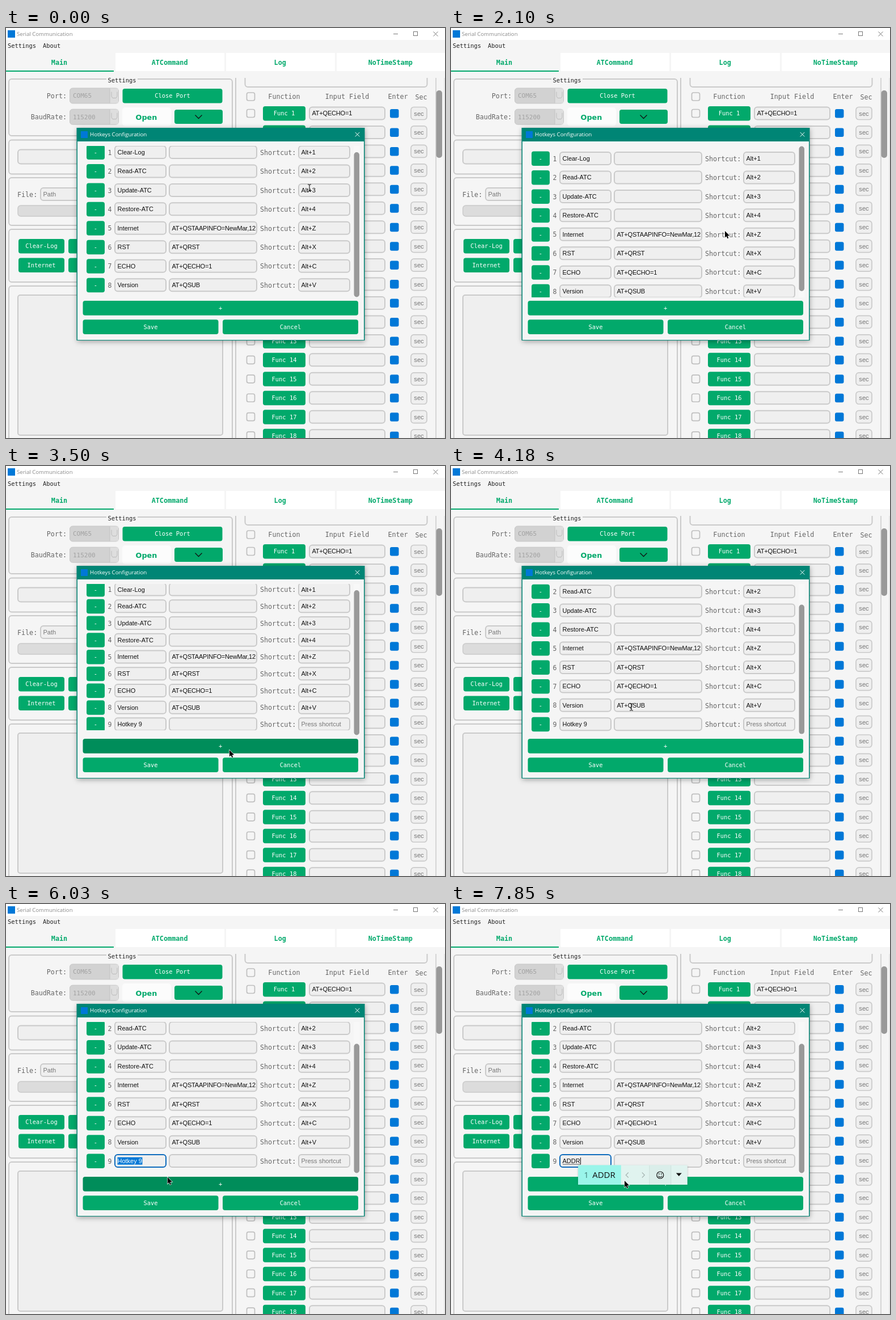
Write an HTML page with a canvas that moves like this. It is 774 px wide and 723 px high and loops after 8 s.

```html
<!DOCTYPE html>
<html lang="en">
<head>
<meta charset="utf-8">
<title>Serial Communication</title>
<style>
  html, body { margin: 0; width: 100%; height: 100%; overflow: hidden; background: #f5f5f5; }
  canvas { display: block; width: 774px; height: 723px; }
</style>
</head>
<body>
<canvas id="stage" width="774" height="723"></canvas>
<script>
const ctx = document.getElementById('stage').getContext('2d');
const LOOP = 8000;
const MONO = '"DejaVu Sans Mono", monospace';
const ARIAL = '"Liberation Sans", sans-serif';
const UI = '"Open Sans", sans-serif';
const GREEN = '#02a96b', HOVER = '#008d5a', BLUE = '#0078d7';
const BG = '#f5f5f5', FIELD = '#efefef', LINE = '#cacaca';
const PITCH = 33.45;

const HOTKEYS = [
  ['Clear-Log', '', 'Alt+1'],
  ['Read-ATC', '', 'Alt+2'],
  ['Update-ATC', '', 'Alt+3'],
  ['Restore-ATC', '', 'Alt+4'],
  ['Internet', 'AT+QSTAAPINFO=NewMar,12', 'Alt+Z'],
  ['RST', 'AT+QRST', 'Alt+X'],
  ['ECHO', 'AT+QECHO=1', 'Alt+C'],
  ['Version', 'AT+QSUB', 'Alt+V'],
  ['Hotkey 9', '', '']
];

// Each pointer move runs in equal steps from start to end through a few points.
const MOVES = [
  { from: 660, to: 990, steps: 6, path: [[535, 282], [483, 358]] },
  { from: 2170, to: 2380, steps: 4, path: [[483, 358], [484, 369]] },
  { from: 2710, to: 3050, steps: 6, path: [[484, 369], [394, 501]] },
  { from: 3760, to: 4180, steps: 7, path: [[394, 501], [318, 425]] },
  { from: 4250, to: 4530, steps: 5, path: [[318, 425], [300, 444], [285, 457]] },
  { from: 4600, to: 5210, steps: 9, path: [[285, 457], [262, 457], [231, 457]] },
  { from: 5280, to: 5350, steps: 2, path: [[231, 457], [200, 457]] },
  { from: 5420, to: 6110, steps: 10, path: [[200, 457], [306, 488]] }
];

const mix = (a, b, k) => a + (b - a) * k;

// Value of the last [time, value] entry already reached.
const at = (t, list) => list.reduce((v, e) => t >= e[0] ? e[1] : v, list[0][1]);

function pointer(t) {
  let pos = MOVES[0].path[0];
  for (const m of MOVES) {
    if (t < m.from) break;
    const step = Math.min(m.steps, Math.floor((t - m.from) / (m.to - m.from) * (m.steps - 1)) + 1);
    const u = step / m.steps * (m.path.length - 1);
    const i = Math.min(Math.floor(u), m.path.length - 2);
    const [a, b] = [m.path[i], m.path[i + 1]];
    pos = [mix(a[0], b[0], u - i), mix(a[1], b[1], u - i)];
  }
  return pos;
}

function box(x, y, w, h, r, fill, stroke, lw = 2) {
  ctx.beginPath();
  ctx.roundRect(x, y, w, h, r);
  if (fill) { ctx.fillStyle = fill; ctx.fill(); }
  if (stroke) { ctx.strokeStyle = stroke; ctx.lineWidth = lw; ctx.stroke(); }
}

function rect(x, y, w, h, fill) {
  ctx.fillStyle = fill;
  ctx.fillRect(x, y, w, h);
}

function line(points, color, lw = 1) {
  ctx.beginPath();
  points.forEach(p => ctx.lineTo(p[0], p[1]));
  ctx.strokeStyle = color;
  ctx.lineWidth = lw;
  ctx.stroke();
}

function text(s, x, cy, size, family, color, align = 'left', weight = '', spacing = 0) {
  ctx.font = `${weight} ${size}px ${family}`;
  ctx.textAlign = align;
  ctx.letterSpacing = spacing + 'px';
  ctx.fillStyle = color;
  ctx.fillText(s, x, cy + size * 0.36);
  ctx.letterSpacing = '0px';
}

function width(s, size, family) {
  ctx.font = `${size}px ${family}`;
  ctx.letterSpacing = '0px';
  return ctx.measureText(s).width;
}

function clipped(x, y, w, h, draw) {
  ctx.save();
  ctx.beginPath();
  ctx.rect(x, y, w, h);
  ctx.clip();
  draw();
  ctx.restore();
}

function button(label, x, y, w, h, fill = GREEN) {
  box(x, y, w, h, 4, fill);
  text(label, x + w / 2, y + h / 2, 10.4, MONO, '#fff', 'center');
}

function field(x, cy, w, value = '', color = '#111', border = LINE) {
  box(x + 1, cy - 11, w - 2, 22, 5, FIELD, border);
  if (!value) return;
  clipped(x, cy - 12, w - 2, 24, () =>
    text(value, x + 5.5, cy, 11, ARIAL, color, 'left', '', value.startsWith('AT+') ? -0.19 : 0));
}

function cross(x, y, r, color) {
  line([[x - r, y - r], [x + r, y + r]], color);
  line([[x + r, y - r], [x - r, y + r]], color);
}

function header() {
  rect(0, 0, 774, 21, '#fff');
  rect(3, 4, 13, 13, BLUE);
  text('Serial Communication', 19, 10.5, 9.6, UI, '#8a8a8a');
  line([[683, 10.5], [691, 10.5]], '#777');
  ctx.strokeRect(718.5, 6.5, 7, 7);
  cross(757.5, 10.5, 4, '#777');
  text('Settings', 3, 31, 10.4, MONO, '#222');
  text('About', 65, 31, 10.4, MONO, '#222');
  ['Main', 'ATCommand', 'Log', 'NoTimeStamp'].forEach((name, i) => {
    if (i) rect(i * 195 - 2, 44, 192, 32, '#fff');
    text(name, 94 + i * 194.6, 61, 11.8, MONO, GREEN, 'center', 'bold');
  });
  rect(0, 75, 190, 2, GREEN);
}

function combo(label, value, y) {
  text(label, 107, y, 11.7, MONO, '#666', 'right');
  box(112.5, y - 13.5, 86, 27, 5, '#d2d2d2', '#c6c6c6', 1);
  rect(183, y - 13, 15, 26, '#dedede');
  line([[183, y - 13], [183, y + 13]], '#c2c2c2');
  line([[186, y - 7], [186, y + 1], [188, y + 4], [194, y + 4], [196, y + 1], [196, y - 7]], '#bbb');
  text(value, 118, y, 11, MONO, '#a2a2a2');
}

function leftPanel() {
  [[90, 100], [197.5, 60], [264, 84], [355, 93], [455, 290]].forEach(([y, h]) =>
    box(5, y, 394, h, 5, null, LINE));
  rect(177, 86, 55, 12, BG);
  text('Settings', 204.5, 92, 10.4, MONO, '#222', 'center');
  combo('Port:', 'COM65', 119.5);
  combo('BaudRate:', '115200', 156.7);
  button('Close Port', 205.5, 107, 176, 25.5);
  box(205, 140, 86, 33, 5, '#fcfcfc');
  text('Open', 247.5, 157, 12.8, '"DejaVu Sans", sans-serif', GREEN, 'center', 'bold');
  box(297, 144, 85, 25, 4, GREEN);
  line([[333.5, 153.5], [339.5, 159.5], [345.5, 153.5]], '#111', 1.3);

  box(21, 214.5, 361, 25, 5, FIELD, LINE);
  text('File:', 20, 293.5, 11.7, MONO, '#666');
  field(60, 293, 240, 'Path', '#777');
  box(21, 313, 361, 19, 5, '#dcdcdc', LINE, 1.5);
  button('Clear-Log', 22, 372, 81, 25.5);
  box(110, 372, 81, 25.5, 4, GREEN);
  button('Internet', 22, 405.5, 81, 25.5);
  box(110, 405.5, 81, 25.5, 4, GREEN);
  box(21, 471, 361, 247, 4, FIELD, LINE);
}

function rightPanel() {
  clipped(400, 88, 374, 635, () => {
    line([[405, 88], [405, 723]], LINE, 2);
    line([[758, 88], [758, 723]], LINE, 1.5);
    line([[773, 88], [773, 723]], '#dadada');
    box(421.5, 60, 321, 44, 5, null, LINE);
    box(758.5, 110, 10.5, 119, 5, '#999');
    box(424.5, 114, 14, 14, 3, BG, '#bfbfbf', 1.7);
    text('Function', 490.5, 121, 11.7, MONO, '#666', 'center');
    text('Input Field', 601.5, 121, 11.7, MONO, '#666', 'center');
    text('Enter', 691, 121, 11.7, MONO, '#666', 'center');
    text('Sec', 732, 121.5, 11.7, MONO, '#666', 'center');
    for (let i = 0; i < 18; i++) {
      const y = 150.5 + i * PITCH;
      box(424.5, y - 7, 14, 14, 3, BG, '#bfbfbf', 1.7);
      button('Func ' + (i + 1), 453, y - 12.5, 75, 25.5);
      field(534, y, 135, i ? '' : 'AT+QECHO=1');
      box(677, y - 7.5, 15.5, 15.5, 3, BLUE);
      box(714, y - 11, 28, 22, 5, FIELD, LINE, 1.7);
      text('sec', 728, y, 11.2, ARIAL, '#777', 'center');
    }
  });
}

// Caret index nearest to x in the edited name field.
function caretIndex(s, x) {
  let i = 0;
  while (i < s.length && 197.5 + (width(s.slice(0, i), 11, ARIAL) + width(s.slice(0, i + 1), 11, ARIAL)) / 2 < x) i++;
  return i;
}

function editor(st, y) {
  field(191, y, 92, st.typed || 'Hotkey 9', '#111', '#0f6cbd');
  if (st.typed) {
    const end = 197.5 + width(st.typed, 11, ARIAL);
    line([[197, y + 6], [end, y + 6]], '#333', 0.8);
    if (st.t >= 7850) line([[228.5, y - 6], [228.5, y + 6]], '#111');
    return;
  }
  const s = 'Hotkey 9';
  const i = caretIndex(s, Math.min(st.x, st.t < 5420 ? 300 : 200));
  if (i < s.length && st.t >= 4600) {
    const x0 = 196.5 + width(s.slice(0, i), 11, ARIAL);
    const w = 197 + width(s, 11, ARIAL) - x0;
    rect(x0, y - 6.5, w, 13, BLUE);
    clipped(x0, y - 8, w, 16, () => text(s, 196.5, y, 11, ARIAL, '#fff'));
  }
  if (st.t >= 6650) line([[198.5, y - 6], [198.5, y + 6]], '#111');
}

function hotkeyRow(row, i, y, st) {
  button('-', 142, y - 12.5, 32, 25.5);
  text(i + 1, 183, y + 0.5, 11.5, MONO, '#666', 'center');
  if (i === 8 && st.focus) editor(st, y);
  else field(191, y, 92, row[0]);
  field(287, y, 156, row[1]);
  text('Shortcut:', 448, y + 0.5, 11.7, MONO, '#666');
  field(515, y, 92, row[2] || 'Press shortcut', row[2] ? '#111' : '#777');
}

function dialog(st) {
  ctx.save();
  ctx.shadowColor = 'rgba(0,0,0,.35)';
  ctx.shadowBlur = 9;
  ctx.shadowOffsetY = 2;
  rect(124.5, 176, 508, 375, '#008575');
  ctx.restore();
  rect(126, 200, 505, 350, BG);
  rect(132, 182, 12, 12, BLUE);
  text('Hotkeys Configuration', 148, 188, 9.7, UI, '#fff');
  cross(619.5, 187.7, 3.8, '#fff');

  clipped(136, 208, 474, st.squeezed ? 258 : 267, () =>
    HOTKEYS.slice(0, st.rows).forEach((row, i) => hotkeyRow(row, i, st.rowY(i), st)));

  const content = 267 + st.maxScroll;
  rect(613, 208, 10.5, 267, '#f8f8f8');
  box(613.5, 208.5 + st.scroll / content * 266, 9.5, 267 / content * 266, 4.7, '#999');

  button('+', 135.5, 481, 485.5, 25.8, st.hover ? HOVER : GREEN);
  button('Save', 135.5, 514.3, 239, 25.8);
  button('Cancel', 382, 514.3, 239, 25.8);
}

function imePopup(typed) {
  const size = 15;
  const left = 193 + width(typed, 11, ARIAL) + (typed === 'A' ? 0.8 : 0);
  const cell = 35 + width(typed, size, UI);
  const extra = typed === 'AD' ? 63 : 0;
  const x = left + cell + extra;
  ctx.save();
  ctx.shadowColor = 'rgba(0,0,0,.2)';
  ctx.shadowBlur = 3;
  rect(left, 460.5, cell + extra + 117, 34.5, '#e0f3ef');
  ctx.restore();
  rect(left, 460.5, cell, 34.5, '#9af5ea');
  text('1', left + 10, 477.5, size, UI, '#3f7f78');
  text(typed, left + 25, 477.5, size, UI, '#111');
  if (extra) {
    text('2', left + cell + 10, 477.5, size, UI, '#6a8580');
    text('广告', left + cell + 25, 477.5, 14, '"Noto Sans CJK SC", "Noto Sans CJK", sans-serif', '#111');
  }
  line([[x + 13, 473.5], [x + 8.5, 478], [x + 13, 482.5]], '#a5b5b2', 1.2);
  line([[x + 37, 473.5], [x + 41.5, 478], [x + 37, 482.5]], '#a5b5b2', 1.2);
  rect(x + 50, 460.5, 38, 34.5, '#daeeea');
  line([[x + 50, 461], [x + 50, 495]], '#cde2dd');
  line([[x + 88, 461], [x + 88, 495]], '#cde2dd');

  ctx.strokeStyle = ctx.fillStyle = '#111';
  ctx.lineWidth = 1.2;
  ctx.beginPath();
  ctx.arc(x + 69, 478, 6, 0, 7);
  ctx.stroke();
  ctx.beginPath();
  ctx.arc(x + 69, 478.5, 3.2, 0.3, Math.PI - 0.3);
  ctx.stroke();
  rect(x + 66.2, 475.2, 1.6, 1.6, '#111');
  rect(x + 70.2, 475.2, 1.6, 1.6, '#111');
  ctx.beginPath();
  ctx.moveTo(x + 97, 474.5);
  ctx.lineTo(x + 107, 474.5);
  ctx.lineTo(x + 102, 480);
  ctx.fill();
}

function drawPointer(st) {
  const { x, y } = st;
  if (st.pressed) {
    ctx.fillStyle = 'rgba(255,236,50,.8)';
    ctx.beginPath();
    ctx.arc(x, y, 8.5, 0, 7);
    ctx.fill();
  }
  if (st.beam) {
    line([[x, y - 6], [x, y + 6]], '#111', 1.1);
    [-6, 6].forEach(d => line([[x - 3, y + d], [x - 0.8, y + d], [x, y + d * 0.85], [x + 0.8, y + d], [x + 3, y + d]], '#111'));
    return;
  }
  const shape = [[0, 0], [0, 11.5], [2.6, 9.2], [4.4, 13.2], [6.2, 12.4], [4.5, 8.5], [8.2, 8.2]];
  ctx.beginPath();
  shape.forEach(p => ctx.lineTo(x + p[0], y + p[1]));
  ctx.closePath();
  ctx.strokeStyle = '#fff';
  ctx.lineWidth = 1.2;
  ctx.stroke();
  ctx.fillStyle = '#000';
  ctx.fill();
}

function stateAt(t) {
  const [x, y] = pointer(t);
  const st = { t, x, y };
  st.rows = t >= 3500 ? 9 : 8;
  st.squeezed = t >= 3500 && t < 3570;
  st.maxScroll = t >= 3570 ? 44.5 : 11;
  st.scroll = at(t, [[0, 11], [1340, 0], [2170, 11], [3570, 42.3], [4390, 44.5]]);
  st.rowY = i => st.squeezed ? 217.6 + i * 29.72 : 230 + i * PITCH - st.scroll;
  st.focus = t >= 4600;
  st.typed = at(t, [[0, ''], [6980, 'A'], [7180, 'AD'], [7380, 'ADD'], [7710, 'ADDR']]);
  st.popup = t >= 7050;
  st.hover = !st.popup && x > 135 && x < 621 && y > 481 && y < 507;
  const dragging = t >= 4600 && t < 5420;
  st.pressed = dragging || (t >= 3440 && t < 3500);
  const inColumn = [[191, 283], [287, 443], [515, 607]].some(([a, b]) => x > a && x < b);
  const inRow = HOTKEYS.slice(0, st.rows).some((_, i) => Math.abs(st.rowY(i) - y) < 12);
  st.beam = dragging || (inColumn && inRow && y > 208 && y < 475);
  return st;
}

function draw(t) {
  const st = stateAt(t);
  rect(0, 0, 774, 723, BG);
  header();
  leftPanel();
  rightPanel();
  dialog(st);
  if (st.popup) imePopup(st.typed);
  drawPointer(st);
}

const start = performance.now();
function tick() {
  draw((performance.now() - start + 2) % LOOP);
  requestAnimationFrame(tick);
}
tick();
</script>
</body>
</html>
```
